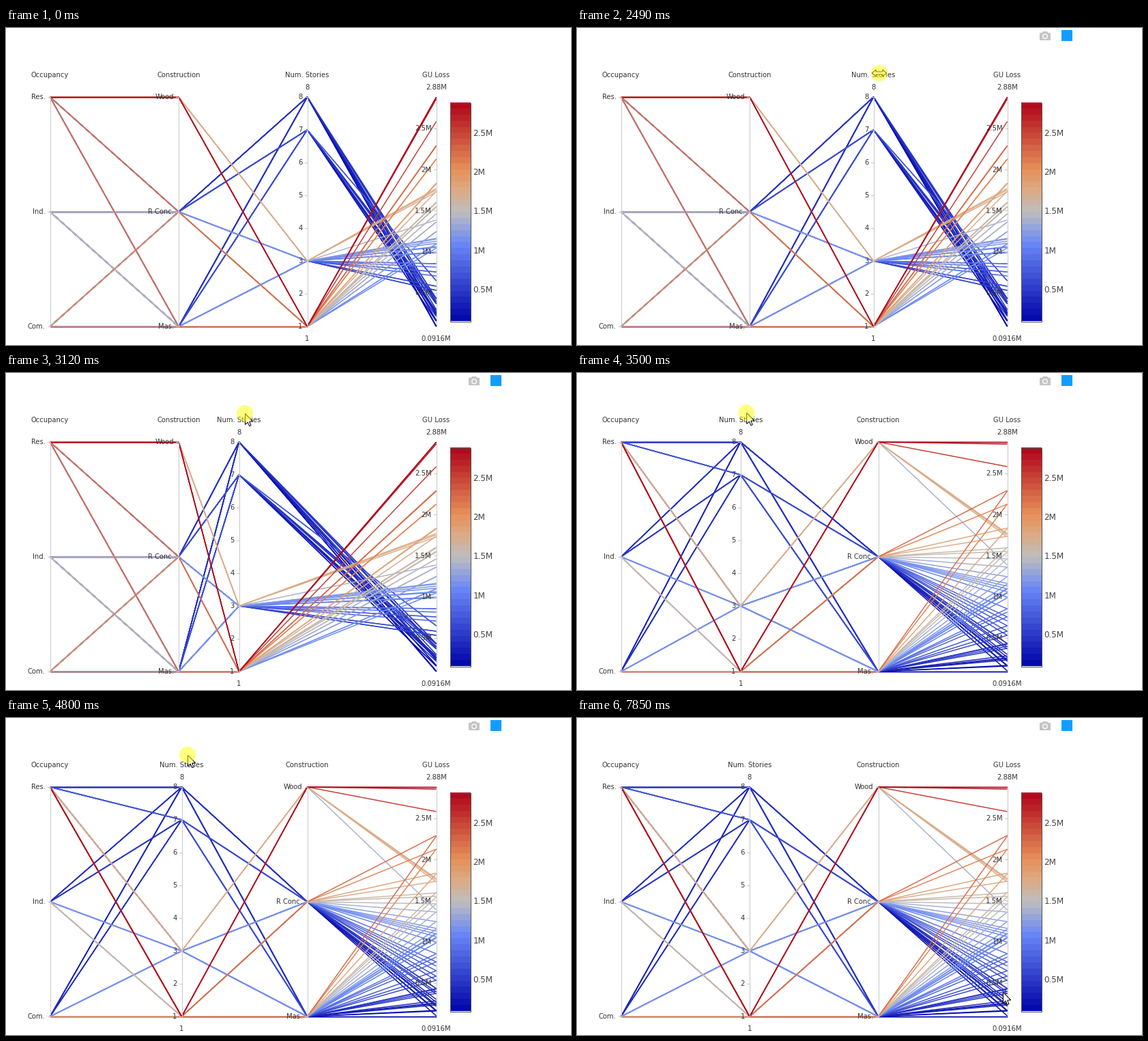
Write a matplotlib script that moves like this. It is 828 px wide and 464 px high and loops after 8000 ms.

```python
from itertools import cycle

import matplotlib.pyplot as plt
import numpy as np
from matplotlib.animation import FuncAnimation
from matplotlib.collections import LineCollection
from matplotlib.colors import LinearSegmentedColormap
from matplotlib.patches import Circle, FancyBboxPatch, Polygon, Rectangle
from matplotlib.transforms import Affine2D

W, H, DPI = 828, 464, 64  # a power of two keeps the pixel size exact
STEP, FRAMES = 40, 200
PX = 72 / DPI
TOP, BOTTOM = 101, 437
SLOTS = (64, 252.5, 441, 630)
LOW, HIGH = 0.0916, 2.88
GRAB, SWAP, DROP = 1550, 3320, 5120

plt.rcParams["font.family"] = "DejaVu Sans"
scale = LinearSegmentedColormap.from_list("loss", [
    (0, (5 / 255, 10 / 255, 172 / 255)),
    (0.35, (106 / 255, 137 / 255, 247 / 255)),
    (0.5, (190 / 255, 190 / 255, 190 / 255)),
    (0.6, (220 / 255, 170 / 255, 132 / 255)),
    (0.7, (230 / 255, 145 / 255, 90 / 255)),
    (1, (178 / 255, 10 / 255, 28 / 255)),
])

fig = plt.figure(figsize=(W / DPI, H / DPI), dpi=DPI, facecolor="white")
ax = fig.add_axes([0, 0, 1, 1])
ax.axis("off")

LEVEL = {"R": 101, "I": 269, "C": 437, "wood": 101, "conc": 269, "mas": 437}


def story_y(n):
    return BOTTOM - (n - 1) * 48


def loss_y(v):
    return BOTTOM - (v - LOW) / (HIGH - LOW) * (BOTTOM - TOP)


# (construction, stories, occupancy pattern, heights on the loss axis)
GROUPS = [
    ("wood", 1, "R", (101, 101.5, 104, 137)),
    ("wood", 3, "R", (235, 237, 240, 281)),
    ("conc", 1, "RCRCIRICIC", (172, 192, 227, 239, 256, 261, 272, 284, 298, 316)),
    ("mas", 1, "RCRICRICIC", (173, 192, 228, 255, 262, 272, 284, 298, 316, 322)),
    ("conc", 3, "ICR", (308, 312, 320, 328, 345, 357, 363, 378, 384)),
    ("mas", 3, "CIR", (309, 315, 321, 329, 345, 350, 357, 378, 384)),
    ("conc", 7, "RIC", (370, 396, 404, 416, 422, 429)),
    ("mas", 7, "RIC", (370, 397, 400, 414, 418, 429)),
    ("conc", 8, "RIC", (396, 401, 412, 420, 428, 436)),
    ("mas", 8, "RIC", (396, 403, 417, 420, 428, 437, 437)),
]

rows = [(LEVEL[occ], LEVEL[con], story_y(n), y)
        for con, n, pattern, ys in GROUPS
        for occ, y in zip(cycle(pattern), ys)]
rows.sort(key=lambda r: -r[3])
table = np.array(rows)
tint = scale((BOTTOM - table[:, 3]) / (BOTTOM - TOP))

lines = LineCollection([], colors=np.repeat(tint, 3, axis=0),
                       linewidths=1.45 * PX, zorder=2)
ax.add_collection(lines)


def label(x, y, s, size=10, color="#333333", ha="center", **kw):
    ax.text(x, y, s, fontsize=size * PX, color=color, ha=ha, va="baseline",
            zorder=5, **kw)


def make_axis(title, ticks, ends=None):
    """Draw one vertical axis at x = 0; the returned shift places it."""
    shift = Affine2D()
    at = {"transform": shift + ax.transData}
    ax.plot([0, 0], [TOP, BOTTOM], color="#c8c8c8", lw=PX, zorder=3, **at)
    label(0, 71.5, title, **at)
    for y, s in ticks:
        ax.plot([-4, 0], [y, y], color="#c8c8c8", lw=PX, zorder=3, **at)
        label(-7, y + 3.5, s, ha="right", **at)
    if ends:
        label(0, 89.5, ends[0], **at)
        label(0, 457.5, ends[1], **at)
    return shift


shifts = [
    make_axis("Occupancy", [(101, "Res."), (269, "Ind."), (437, "Com.")]),
    make_axis("Construction", [(101, "Wood"), (269, "R Conc."), (437, "Mas.")]),
    make_axis("Num. Stories", [(story_y(n), str(n)) for n in range(1, 9)],
              ("8", "1")),
    make_axis("GU Loss", [(loss_y(v), f"{v:g}M") for v in (0.5, 1, 1.5, 2, 2.5)],
              ("2.88M", "0.0916M")),
]

# colour bar
BAR = (651, 681, 429.5, 109.5)
ax.imshow(np.linspace(1, 0, 36)[:, None], cmap=scale, extent=BAR,
          origin="upper", aspect="auto", interpolation="nearest", zorder=2)
ax.add_patch(Rectangle((651, 109.5), 30, 320, fill=False, ec="#555555",
                       lw=PX, zorder=3))
for v in (0.5, 1, 1.5, 2, 2.5):
    y = 429.5 - (v - LOW) / (HIGH - LOW) * 320
    label(684.5, y + 4.5, f"{v:g}M", size=12, color="#444444", ha="left")

# toolbar
GREY = "#c4c4c4"
tools = [
    FancyBboxPatch((679, 8), 14, 9, boxstyle="round,pad=1", fc=GREY, ec="none"),
    Polygon([(681, 8), (683, 5), (689, 5), (691, 8)], fc=GREY, ec="none"),
    Circle((686, 12.3), 4, fc="white", ec="none"),
    Circle((686, 12.3), 2.6, fc=GREY, ec="none"),
    Rectangle((710, 3), 16, 16, fc="#119dff", ec="none"),
]
for z, p in enumerate(tools):
    p.set_zorder(6 + z / 10)
    ax.add_patch(p)

# pointers
ARROW = np.array([(0, 0), (0, 16), (3.7, 12.6), (6.2, 18.2), (8.6, 17.2),
                  (6.2, 11.6), (11.2, 11.4)])
RESIZE = np.array([(-10.5, 0), (-5, -5), (-5, -2), (5, -2), (5, -5), (10.5, 0),
                   (5, 5), (5, 2), (-5, 2), (-5, 5)])


def pointer(shape):
    p = Polygon(shape, fc="white", ec="black", lw=PX, joinstyle="miter", zorder=8)
    ax.add_patch(p)
    return p


arrow, resize = pointer(ARROW), pointer(RESIZE)
halo = Circle((0, 0), 12, fc="#ffff00", ec="none", alpha=0.5, zorder=9)
ax.add_patch(halo)

ax.set_xlim(0, W)
ax.set_ylim(H, 0)

# time, x, y of the pointer
PATH = np.array([
    (70, 743, 446), (460, 590, 230), (860, 450, 62), (1550, 450, 65),
    (1740, 450, 65), (1940, 445, 65), (2310, 445, 65), (2330, 444, 65),
    (2460, 444, 66), (2490, 443, 66), (2520, 443, 66), (3110, 350, 59),
    (3150, 350, 59), (3260, 296, 58), (3340, 258, 58), (3600, 241, 58),
    (3870, 248, 58), (3920, 248, 58), (4030, 252, 58), (4400, 252, 58),
    (4800, 266, 54), (5200, 266, 54), (5670, 268, 97), (5800, 268, 97),
    (6590, 467, 241), (6725, 490, 245), (6780, 490, 245), (7180, 734, 435),
    (7490, 650, 405), (7700, 613, 397), (7850, 624, 401),
]).T


def stories_x(t, px):
    if t < DROP:
        return min(px - 9, SLOTS[2]) if t >= GRAB else SLOTS[2]
    left = max(0, 1 - (t - DROP) / 300)
    return SLOTS[1] + 4.5 * left ** 2


def update(i):
    t = i * STEP + 10
    px = np.interp(t, PATH[0], PATH[1])
    py = np.interp(t, PATH[0], PATH[2])

    swapped = t >= SWAP
    order = [0, 2, 1, 3] if swapped else [0, 1, 2, 3]
    xs = [SLOTS[0], SLOTS[2] if swapped else SLOTS[1], stories_x(t, px), SLOTS[3]]
    for shift, x in zip(shifts, xs):
        shift.clear().translate(x + 0.5, 0)

    pts = np.empty((len(table), 4, 2))
    pts[:, :, 0] = np.array(xs)[order] + 0.5
    pts[:, :, 1] = table[:, order]
    lines.set_segments(np.stack([pts[:, :-1], pts[:, 1:]], axis=2).reshape(-1, 2, 2))

    over_title = 1180 <= t < 2600
    arrow.set_visible(t >= 70 and not over_title)
    resize.set_visible(over_title)
    arrow.set_xy(ARROW + (px + 0.5, py + 0.5))
    resize.set_xy(RESIZE + (px, py))
    halo.set_visible(GRAB <= t < DROP)
    halo.center = (px, py)
    for p in tools:
        p.set_visible(t >= 150)
    return []


anim = FuncAnimation(fig, update, frames=FRAMES, interval=STEP,
                     init_func=lambda: update(0), repeat=True, blit=False)
plt.show()
```
